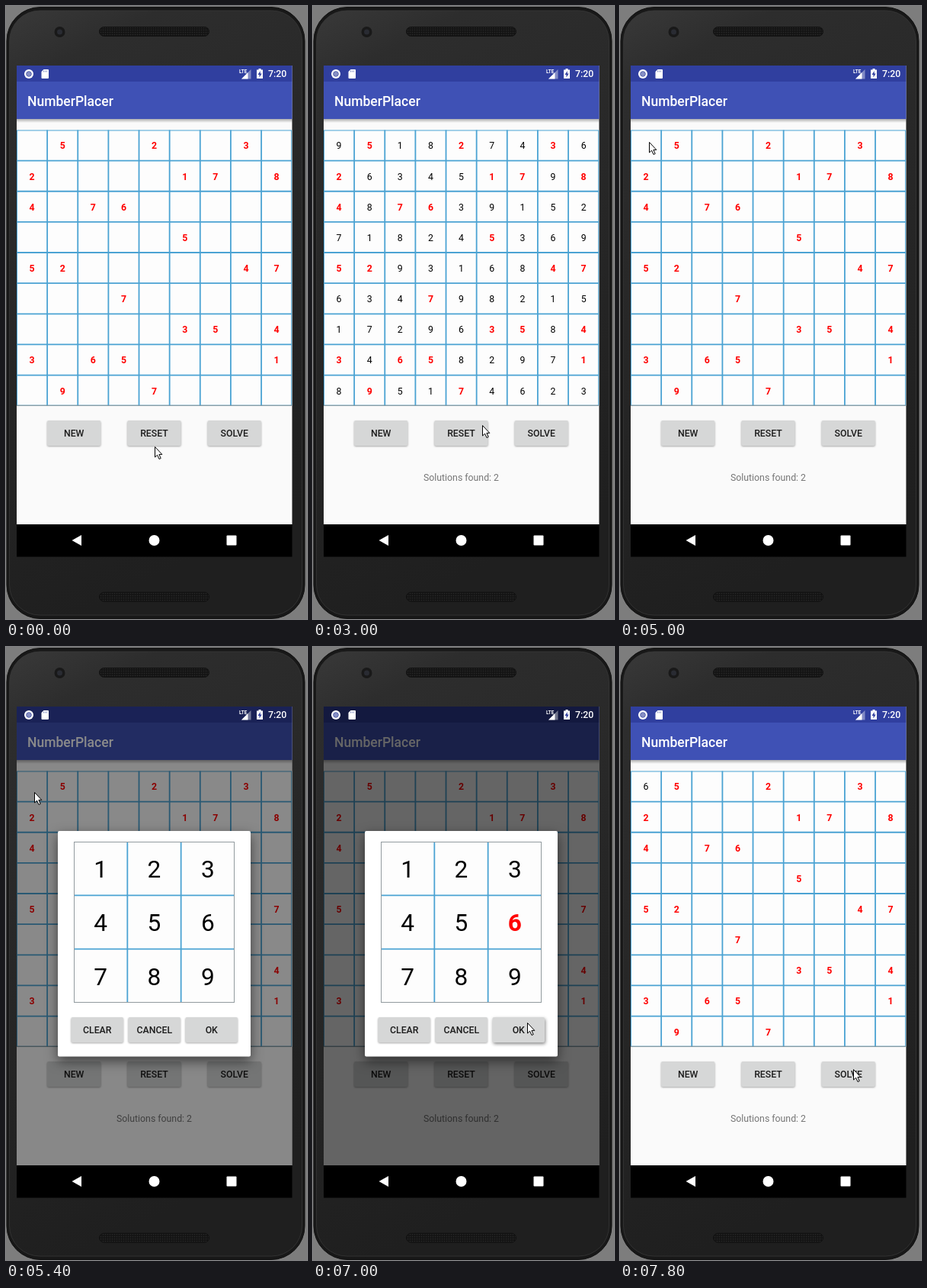
Animation of 395 by 803 pixels, one loop 8000 ms. Source, as an HTML page:

```html
<!DOCTYPE html>
<html lang="en">
<head>
<meta charset="utf-8">
<title>Number grid</title>
<style>
html, body { margin: 0; width: 100%; height: 100%; overflow: hidden; background: #7d7d7d; }
svg { display: block; width: 100vw; height: 100vh; font: 12.3px Roboto, sans-serif; }
.mid { text-anchor: middle; }
.medium { font-weight: 500; }
.given { fill: #f00; font-weight: 700; }
.button rect { fill: #d6d7d7; filter: drop-shadow(0 1px 1px #0005); }
.button.pressed rect { filter: drop-shadow(1px 2px 2px #0007); }
.button text { fill: #1c1c1c; font-weight: 500; }
#pad .digits { font-size: 31.6px; }
#dialog > rect { filter: drop-shadow(0 6px 8px #0008); }
</style>
</head>
<body>
<svg viewBox="0 0 395 803" preserveAspectRatio="none">
  <defs>
    <linearGradient id="shell" x2=".25" y2="1">
      <stop stop-color="#393939"/><stop offset=".12" stop-color="#2d2d2d"/><stop offset="1" stop-color="#1f1f1f"/>
    </linearGradient>
    <linearGradient id="barShade" x2="0" y2="1">
      <stop stop-opacity=".3"/><stop offset="1" stop-opacity="0"/>
    </linearGradient>
    <pattern id="mesh" width="3" height="3" patternUnits="userSpaceOnUse">
      <rect width="3" height="3" fill="#141414"/><circle cx="1.5" cy="1.5" r=".8" fill="#292929"/>
    </pattern>
  </defs>

  <rect width="395" height="803" fill="#7d7d7d"/>
  <rect x="1" y="1.5" width="391" height="801" rx="44" fill="#181818" stroke="#111"/>
  <rect x="4.5" y="6" width="384" height="792" rx="40" fill="url(#shell)" stroke="#3b3b3b" stroke-width=".7"/>
  <g fill="url(#mesh)" stroke="#111">
    <rect x="122.5" y="27.5" width="144" height="12" rx="6"/>
    <rect x="122.5" y="768" width="144" height="12" rx="6"/>
  </g>
  <circle cx="70.5" cy="34" r="7" fill="#191919"/>
  <circle cx="70.5" cy="34" r="3.5" fill="#292b32"/>

  <rect x="14" y="78" width="361.5" height="643.5"/>
  <rect x="14" y="78" width="361.5" height="601" fill="#fafafa"/>
  <rect x="14" y="148" width="361.5" height="5" fill="url(#barShade)"/>
  <rect x="14" y="78" width="361.5" height="21" fill="#303f9f"/>
  <rect x="14" y="99" width="361.5" height="49" fill="#3f51b5"/>
  <text class="medium" x="28" y="131" font-size="17.55" fill="#fff">NumberPlacer</text>
  <g id="board"></g>
  <g id="actions"></g>
  <text id="status" class="mid" x="194.5" y="622" fill="#757575">Solutions found: 2</text>
  <rect id="dim" x="14" y="78" width="361.5" height="601"/>

  <g id="dialog">
    <rect x="68" y="241" width="253" height="295.5" rx="2" fill="#fff"/>
    <g id="pad"></g>
    <g id="choices"></g>
  </g>

  <g fill="#fff">
    <circle cx="30" cy="89" r="6"/>
    <circle cx="30" cy="89" r="3.3" fill="#8790c5" stroke="#5966ad"/>
    <path d="M49.5 83H55q1 0 1 1V94q0 1-1 1H47.500q-1 0-1-1V86Z"/>
    <path d="M49.500 84.500v2m2-2v2m2-2v2" stroke="#6975b5" stroke-width=".8"/>
    <text x="306" y="87.500" font-size="6.3" font-weight="700">LTE</text>
    <path d="M309 95.500 321.500 83V95.500Z" opacity=".4"/>
    <path d="M309 95.500 317.500 87V95.500Z"/>
    <path d="M331.500 82h3v1.500H337V95h-8V83.500h2.500Z"/>
    <path d="M333.700 85 330.500 90h2v3.500l3.200-5h-2Z" fill="#303f9f"/>
    <text class="medium" x="344" y="93.300">7:20</text>
    <path d="M86.500 700 99 693V707Z"/>
    <circle cx="194.500" cy="700" r="7"/>
    <rect x="289.500" y="693.500" width="13" height="13" rx="1"/>
  </g>
  <path id="cursor" d="M.5.5V14L3.600 11.200 6 16.500 8.200 15.500 5.900 10.400H9.800Z" fill="#fff" stroke="#000" stroke-linejoin="round"/>
</svg>
<script>
const LOOP = 8000, TICK = 200;
const givens = "050020030200001708407600000000005000520000047000700000000003504306500001090070000";
const solved = "951827436263451798487639152718245369529316847634798215172963584346582971895174623";

// time, x, y
const cursorPath = [
  [0, 195, 577], [400, 150, 525], [600, 113, 440], [800, 160, 350], [1000, 270, 339],
  [1200, 355, 400], [1400, 345, 490], [1800, 300, 555], [2400, 298, 556], [3000, 222, 549],
  [3600, 219, 550], [4000, 219, 551], [4200, 165, 440], [4600, 32, 152], [4800, 19, 159],
  [5000, 38, 178], [5200, 38, 178], [5400, 37, 190], [5600, 90, 245], [6000, 262, 362],
  [6400, 266, 367], [6800, 281, 492], [7200, 281, 492], [7600, 303, 549], [7800, 306, 553]
];
const dimPath = [[0, 0], [5200, 0], [5400, .46], [5600, .6], [7000, .6], [7200, .235], [7400, 0]];

const $ = id => document.getElementById(id);

function add(parent, tag, attrs, text = "") {
  const node = document.createElementNS("http://www.w3.org/2000/svg", tag);
  for (const key in attrs) node.setAttribute(key, attrs[key]);
  node.textContent = text;
  return parent.appendChild(node);
}

function makeGrid(parent, x, y, count, pitch, drop, edge) {
  const size = count * pitch;
  add(parent, "rect", { x, y, width: size, height: size, fill: "#fdfdfd" });
  let lines = "";
  for (let i = 1; i < count; i++)
    lines += `M${x + i * pitch} ${y}v${size}M${x} ${y + i * pitch}h${size}`;
  add(parent, "path", { d: lines, stroke: "#4ba3d3", "stroke-width": 1.8 });
  add(parent, "rect", { x: x + .5, y: y + .5, width: size - 1, height: size - 1, fill: "none", stroke: edge });
  const digits = add(parent, "g", { class: "digits mid" });
  return Array.from({ length: count * count }, (_, i) => add(digits, "text", {
    x: x + (i % count + .5) * pitch,
    y: y + (Math.floor(i / count) + .5) * pitch + drop
  }));
}

function makeButton(parent, x, y, width, label) {
  const group = add(parent, "g", { class: "button" });
  add(group, "rect", { x, y, width, height: 33, rx: 2 });
  add(group, "text", { class: "mid", x: x + width / 2, y: y + 21 }, label);
  return group;
}

const cells = makeGrid($("board"), 14, 162.5, 9, 40.13, 4.9, "#4ba3d3");
add($("board"), "path", { d: "M14 523.300h361.500", stroke: "#8b9496" });
cells.forEach((cell, i) => { if (givens[i] > 0) cell.classList.add("given"); });
const keys = makeGrid($("pad"), 89, 255, 3, 70.33, 12, "#929b9f");
keys.forEach((key, i) => key.textContent = i + 1);
const [, resetButton, solveButton] = ["NEW", "RESET", "SOLVE"]
  .map((label, i) => makeButton($("actions"), 54 + i * 105.3, 543, 70.3, label));
const okButton = ["CLEAR", "CANCEL", "OK"]
  .map((label, i) => makeButton($("choices"), 85.5 + i * 75, 485, 68.5, label))[2];

function sample(path, t) {
  const next = path.findIndex(p => p[0] > t);
  if (next < 0) return path.at(-1).slice(1);
  const a = path[next - 1], b = path[next];
  const k = (t - a[0]) / (b[0] - a[0]);
  return a.slice(1).map((v, i) => v + (b[i + 1] - v) * k);
}

function render(t) {
  const within = (from, to) => t >= from && t < to;
  const [x, y] = sample(cursorPath, t).map(Math.round);
  $("cursor").setAttribute("transform", `translate(${x} ${y})`);
  $("dim").setAttribute("opacity", sample(dimPath, t)[0]);

  const digits = within(2200, 4000) ? solved : t >= 7200 ? "6" + givens.slice(1) : givens;
  cells.forEach((cell, i) => cell.textContent = digits[i] > 0 ? digits[i] : "");
  $("status").style.opacity = t >= 2200 ? 1 : 0;

  const closing = within(7200, 7400);
  $("dialog").style.opacity = within(5400, 7200) ? 1 : closing ? .02 : 0;
  $("dialog").setAttribute("transform", closing ? "translate(7.8 15.5) scale(.96)" : "");
  keys[5].classList.toggle("given", t >= 6200);

  solveButton.classList.toggle("pressed", within(2000, 2600));
  resetButton.classList.toggle("pressed", within(3800, 4200));
  okButton.classList.toggle("pressed", within(7000, 7200));
}

const start = performance.now();
function frame() {
  const t = (performance.now() - start) % LOOP;
  render(Math.floor(t / TICK) * TICK);
  requestAnimationFrame(frame);
}
frame();
</script>
</body>
</html>
```
